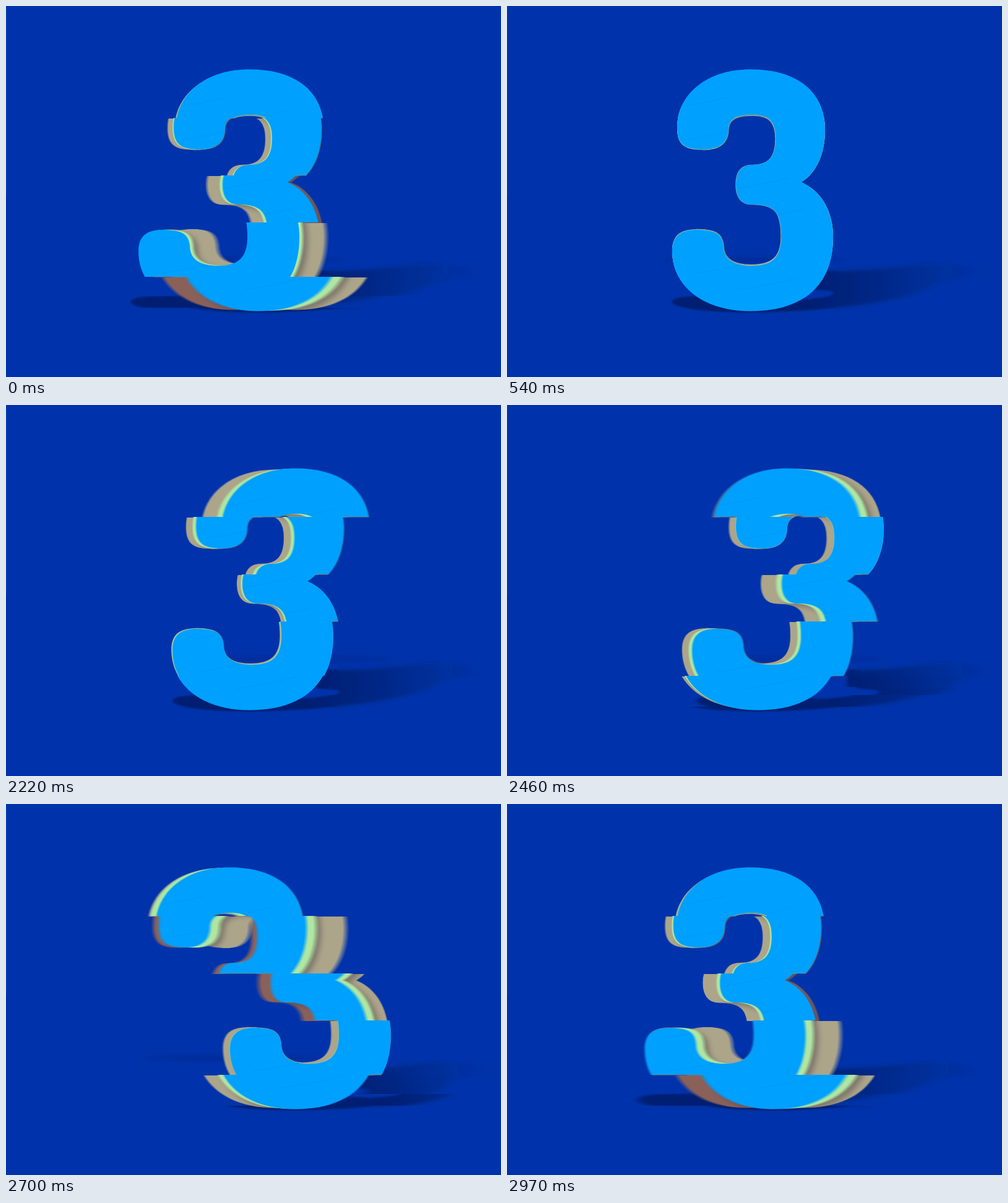
An HTML page with a canvas that plays this animation: 800x600 px, repeating every 3 s.

```html
<!DOCTYPE html>
<html lang="en">
<head>
<meta charset="utf-8">
<title>Sliced three</title>
<style>
  html, body { margin: 0; width: 100%; height: 100%; overflow: hidden; background: #0033ab; }
  canvas { display: block; width: 800px; height: 600px; }
</style>
</head>
<body>
<canvas id="stage" width="800" height="600"></canvas>
<script>
const W = 800, H = 600;
const LOOP = 3000, STEP = 30, START = 1740, END = 540, DELAY = 120;

// Horizontal slices of the figure, top to bottom.
const cuts = [90, 181, 274, 350, 438, 510];

// Swing of one slice, sampled every 60 ms.
const swing = [0, .5, 2, 6, 12, 20, 32, 51, 74, 90, 95, 84, 58, 14, -28, -53, -33, -20, -9.5, -4, -1.5, -.3, 0];

const inner = `C336 362 348 368 350 388 C350 410 367 420 395 420 C427 420 443 408 443 374
  C443 334 434 321 395 321 C377 321 370 307 370 289 C370 268 379 257 396 257
  C424 257 434 243 434 214 C434 187 424 176 397 176 C370 176 358 183 358 200
  C357 222 343 232 317 232`;
const three = new Path2D(`M275 196 C275 147 318 102.5 394 102.5 C472 102.5 514 141 514 200
  C514 240 499 271 475 285 C507 298 527 331 527 374 C527 451 480 493.5 393 493.5
  C316 493.5 267 452 267 397 C267 372 280 362 306 362 ${inner} C287 232 275 224 275 196Z`);
const rim = new Path2D('M306 362 ' + inner);

const makeCtx = () => {
  const c = document.createElement('canvas');
  c.width = W;
  c.height = H;
  return c.getContext('2d');
};
const stage = document.getElementById('stage').getContext('2d');
const layer = makeCtx();
const ground = makeCtx();
const haze = makeCtx();

function swingAt(s) {
  const last = swing.length - 1;
  const p = Math.max(0, Math.min(last, s / 60));
  const i = Math.min(last - 1, Math.floor(p)), u = p - i;
  const v = k => swing[Math.max(0, Math.min(last, k))];
  const a = v(i - 1), b = v(i), c = v(i + 1), d = v(i + 2);
  return b + .5 * u * (c - a + u * (2 * a - 5 * b + 4 * c - d + u * (3 * (b - c) + d - a)));
}

// Time shifts of the stacked copies.
const front = s => s;
const near = s => s - 24;
const far = s => s - 88;
const ahead = (s, b) => s + (3 + 13 * b) * Math.max(0, Math.min(1, (s - 600) / 60));

function inSlice(ctx, b, dy, draw) {
  ctx.save();
  ctx.beginPath();
  ctx.rect(0, cuts[b] + dy, W, cuts[b + 1] - cuts[b]);
  ctx.clip();
  draw();
  ctx.restore();
}

// One motion-blurred copy of the figure; back copies are slightly flatter.
function paintCopy(base, { time, color, shutter, flat = 1, drop = 0, edge, caster, grain, reach = -99 }) {
  const n = 8;
  layer.clearRect(0, 0, W, H);
  for (let b = 0; b < 5; b++) {
    const s = time(base - b * DELAY, b);
    inSlice(layer, b, drop, () => {
      layer.globalCompositeOperation = 'lighter';
      layer.globalAlpha = 1 / n;
      layer.fillStyle = layer.strokeStyle = '#fff';
      layer.lineWidth = 1.4;
      for (let i = 0; i < n; i++) {
        const x = swingAt(s + shutter * ((i + .5) / n - .5));
        layer.save();
        layer.translate(Math.max(reach, x), 298 * (1 - flat));
        layer.scale(1, flat);
        if (edge) layer.stroke(rim);
        layer.fill(three);
        layer.restore();
      }
    });
  }
  layer.globalCompositeOperation = 'source-in';
  layer.fillStyle = color;
  layer.fillRect(0, 0, W, H);
  layer.globalCompositeOperation = 'source-atop';
  for (let b = 0; b < 5; b++) {
    const s = base - b * DELAY;
    if (caster) inSlice(layer, b, drop, () => {
      layer.translate(swingAt(caster(s)) + 8, 5);
      layer.filter = 'blur(4px)';
      layer.fillStyle = 'rgba(60,50,65,.4)';
      layer.fill(three);
    });
    if (grain) inSlice(layer, b, drop, () => {
      layer.translate(swingAt(s), 0);
      drawGrain(layer);
    });
  }
  layer.globalCompositeOperation = 'source-over';
  stage.drawImage(layer.canvas, 0, 0);
}

// Faint slanted brush strokes on the front face.
function drawGrain(ctx) {
  ctx.strokeStyle = 'rgba(0,90,225,.09)';
  ctx.lineWidth = 1.3;
  ctx.beginPath();
  for (let i = 0; i < 12; i++) {
    const x = 285 + (i * 67) % 130, y = 162 + i * 27, len = 70 + (i * 41) % 60;
    ctx.moveTo(x, y);
    ctx.quadraticCurveTo(x + len / 2, y - len * .07, x + len, y - len * .2);
  }
  ctx.stroke();
}

function buildShadow() {
  const fade = ground.createLinearGradient(260, 0, 775, 0);
  [[0, .46], [.45, .46], [.6, .35], [.78, .18], [1, 0]].forEach(([p, a]) =>
    fade.addColorStop(p, `rgba(0,8,50,${a})`));
  ground.fillStyle = fade;
  const part = (x, w, blur, d) => {
    ground.save();
    ground.beginPath();
    ground.rect(x, 380, w, 130);
    ground.clip();
    ground.filter = `blur(${blur}px)`;
    ground.fill(new Path2D(d));
    ground.restore();
  };
  part(0, 530, 1.5, `M266 479 C267 470 292 469 330 468 L470 475 C505 473 526 469 528 464
    C524 459 505 461 490 458 L490 428 L560 427 L560 485 C510 491 450 496 390 496 C310 495 270 488 266 479Z`);
  part(530, 270, 3, `M500 428 C570 429 610 424 660 418 C720 412 790 426 768 434
    C735 442 712 440 690 453 C660 470 600 484 500 491Z`);

  haze.filter = 'blur(3px)';
  haze.fillStyle = 'rgba(0,10,70,.13)';
  haze.beginPath();
  haze.ellipse(400, 411, 150, 6, 0, 0, 7);
  haze.fill();
}

// Ground shadow rows: top, bottom, slice that drives them, share of its swing.
const rows = [[395, 438, 2, .5], [438, 456, 2, .8], [456, 469, 2, 1], [469, 488, 3, 1.25], [488, 505, 4, .95]];

// The near part of each row slides along; the far tail stretches to follow.
function paintShadow(base) {
  const n = 4, split = 530, tail = W - split;
  stage.drawImage(haze.canvas, swingAt(base), 0);
  for (const [y, bottom, b, share] of rows) {
    const h = bottom - y;
    layer.clearRect(0, 0, W, H);
    layer.globalCompositeOperation = 'lighter';
    layer.globalAlpha = 1 / n;
    for (let i = 0; i < n; i++) {
      const x = share * swingAt(base - b * DELAY + 8 * (i - 1.5));
      layer.drawImage(ground.canvas, 0, y, split, h, x, y, split, h);
      layer.drawImage(ground.canvas, split, y, tail, h, split + x, y, tail - .8 * x, h);
    }
    layer.globalAlpha = 1;
    layer.globalCompositeOperation = 'source-over';
    stage.drawImage(layer.canvas, 0, 0);
  }
}

const copies = [
  { time: ahead, color: '#8a6159', shutter: 14, flat: .99, drop: 1, caster: front, reach: -43 },
  { time: far, color: '#aca58a', shutter: 14, flat: .99, drop: 1, edge: true, caster: near },
  { time: near, color: '#aee6a2', shutter: 14, flat: .996 },
  { time: front, color: '#00a0ff', shutter: 12, grain: true }
];

function render(t) {
  const base = t >= START ? t - START : t < END ? t + LOOP - START : 1e5;
  stage.fillStyle = '#0033ab';
  stage.fillRect(0, 0, W, H);
  stage.fillStyle = 'rgba(0,90,200,.35)';
  stage.fillRect(0, 0, 1, 308);
  paintShadow(base);
  copies.forEach(c => paintCopy(base, c));
}

buildShadow();
const begin = performance.now();
let shown = -1;
function tick() {
  const t = Math.floor(((performance.now() - begin) % LOOP) / STEP) * STEP;
  const key = t >= END && t < START ? END : t;
  if (key !== shown) render(shown = key);
  requestAnimationFrame(tick);
}
tick();
</script>
</body>
</html>
```
